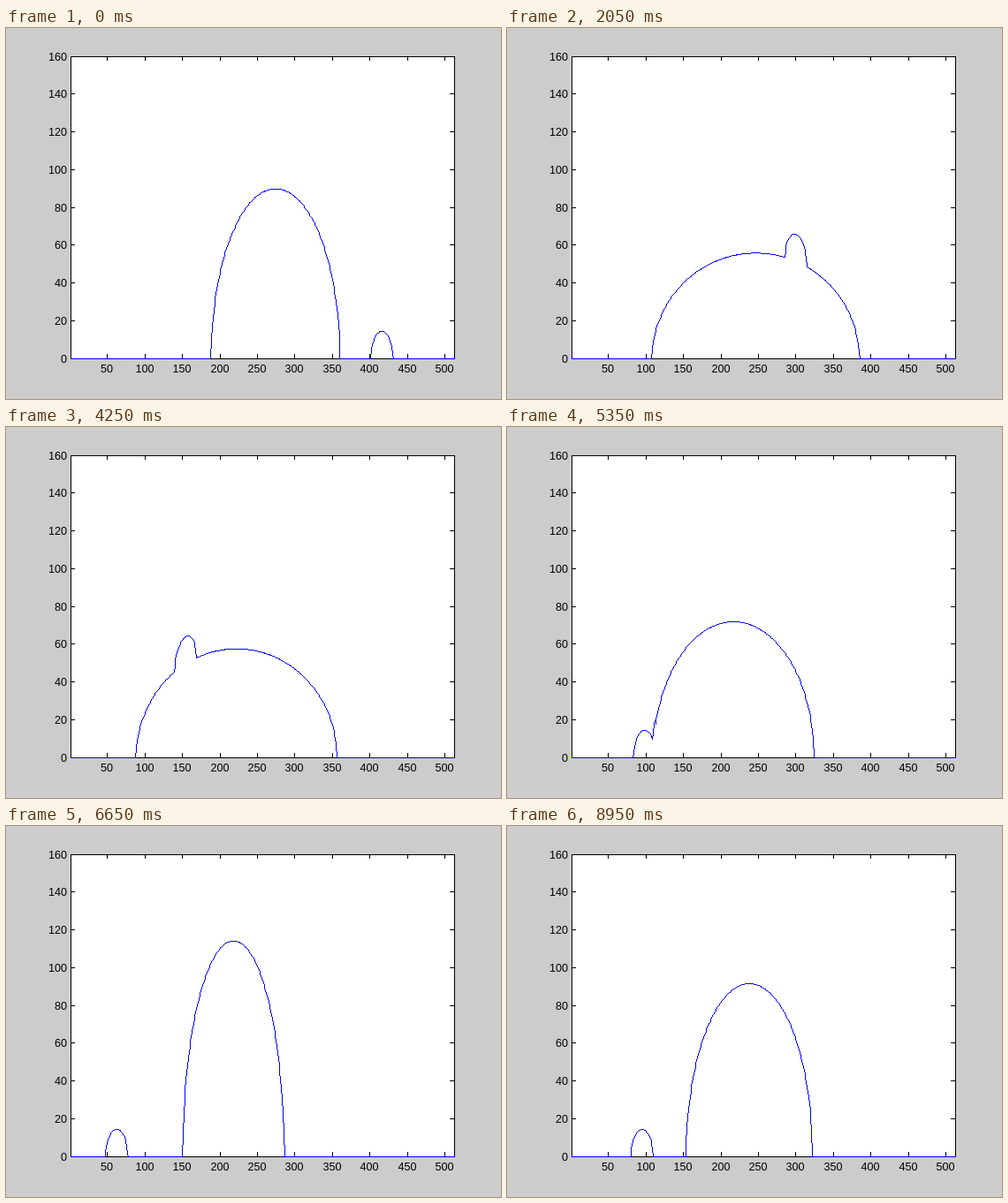
Recreate the animation shown at these times as an HTML page with a canvas. Size 560 px wide and 420 px high, loop 9 s.

```html
<!DOCTYPE html>
<html>
<head>
<meta charset="utf-8">
<style>
  html, body { margin: 0; width: 100%; height: 100%; overflow: hidden; background: #ccc; }
  canvas { display: block; }
</style>
</head>
<body>
<canvas id="plot" width="560" height="420"></canvas>
<script>
const ctx = document.getElementById('plot').getContext('2d');
const STEP_MS = 50, STEPS = 180, MIDDLE = 256.3;

const toX = x => Math.round(72.5 + (x - 1) * 434 / 511);
const toY = y => Math.round(373.7 - y * 342 / 160);

const deg = a => a * Math.PI / 180;

// Parallel projections of two ellipses, seen from a turning direction.
const shapes = [
  { x: 17.8, y: -35.8, a: 145, b: 54.1, tilt: 60.4, area: 7700 },
  { x: 159.3, y: -116.5, a: 14.6, b: 14.6, tilt: 0, area: 210 }
];

function projection(shape, angle) {
  const t = deg(angle), u = deg(angle - shape.tilt);
  const center = MIDDLE + shape.x * Math.cos(t) + shape.y * Math.sin(t);
  const half = Math.hypot(shape.a * Math.cos(u), shape.b * Math.sin(u));
  return s => shape.area / half * Math.sqrt(Math.max(0, 1 - ((s - center) / half) ** 2));
}

// One-pixel line without smoothing.
function pixelLine(x0, y0, x1, y1) {
  const n = Math.max(Math.abs(x1 - x0), Math.abs(y1 - y0), 1);
  for (let i = 0; i <= n; i++) {
    ctx.fillRect(Math.round(x0 + (x1 - x0) * i / n), Math.round(y0 + (y1 - y0) * i / n), 1, 1);
  }
}

function drawAxes() {
  ctx.fillStyle = '#ccc';
  ctx.fillRect(0, 0, 560, 420);
  ctx.fillStyle = '#000';
  ctx.fillRect(73, 32, 435, 343);
  ctx.fillStyle = '#fff';
  ctx.fillRect(74, 33, 433, 341);

  ctx.fillStyle = '#000';
  ctx.font = '12.6px "Liberation Sans", Arial, sans-serif';
  ctx.textAlign = 'center';
  for (let v = 50; v <= 500; v += 50) {
    const x = toX(v);
    ctx.fillRect(x, 33, 1, 4);
    ctx.fillRect(x, 369, 1, 5);
    ctx.fillText(v, x, 390);
  }
  ctx.textAlign = 'right';
  for (let v = 0; v <= 160; v += 20) {
    const y = toY(v);
    ctx.fillRect(74, y, 4, 1);
    ctx.fillRect(502, y, 5, 1);
    ctx.fillText(v, 69, y + 5);
  }
}

function drawCurve(angle) {
  const parts = shapes.map(s => projection(s, angle));
  const height = s => parts.reduce((sum, p) => sum + p(s), 0);
  ctx.fillStyle = '#00f';
  let px = toX(1), py = toY(height(1));
  for (let s = 2; s <= 512; s++) {
    const x = toX(s), y = toY(height(s));
    pixelLine(px, py, x, y);
    px = x;
    py = y;
  }
}

let shown = -1;
function frame() {
  const angle = Math.floor(performance.now() / STEP_MS) % STEPS;
  if (angle !== shown) {
    drawAxes();
    drawCurve(angle);
    shown = angle;
  }
  requestAnimationFrame(frame);
}
frame();
</script>
</body>
</html>
```
